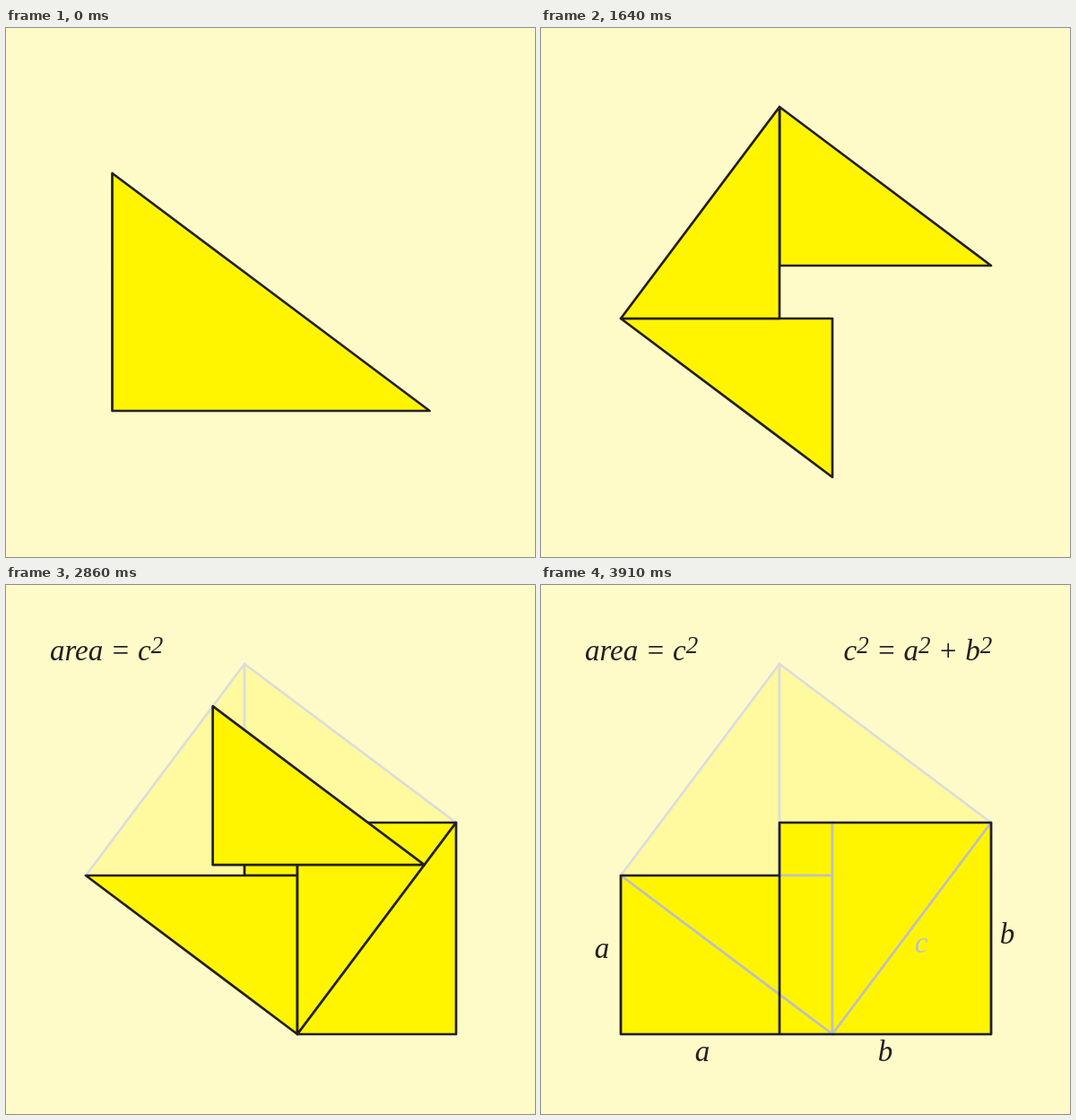
Animation of 590 by 590 pixels, one loop 5160 ms. Source, as an HTML page:

```html
<!DOCTYPE html>
<html lang="en">
<head>
<meta charset="utf-8">
<title>Pythagorean rearrangement</title>
<style>
  html, body { margin: 0; width: 100%; height: 100%; overflow: hidden; background: #fffbc8; }
  svg { display: block; width: 100%; height: 100%; --ink: #231f20; }
  .shape { fill: #fff500; stroke: var(--ink); }
  .ghost { fill: #fff99f; stroke: #dcdddd; }
  .shape, .ghost, .frame { stroke-width: 2.7; stroke-linejoin: round; }
  .frame { fill: none; stroke: #231f20; }
  text { font: italic 33px "Liberation Serif", "Times New Roman", serif; fill: #231f20; }
  .label text { text-anchor: middle; }
  .fading text { fill: var(--ink); }
  .small text { font-size: 25px; }
  .sup { font-size: 27px; }
</style>
</head>
<body>
<!-- data-on / data-off: visible time span in ms -->
<svg viewBox="0 0 590 590">
  <path class="ghost" data-on="2290" d="M266 88V324H89Z"/>
  <path class="ghost" data-on="2860" d="M266 88V265H502Z"/>

  <path class="shape" data-on="1960" d="M266 265H325V324H266Z"/>
  <path class="shape" data-on="1640" d="M89 324H325V501Z"/>
  <path class="shape" data-on="1800" d="M502 265H325V501Z"/>
  <g class="label small" data-on="1960" data-off="2610">
    <text x="385" y="164">c</text>
    <text x="430" y="396.5">c</text>
  </g>
  <g id="movers">
    <path id="first" class="shape"/>
    <path id="second" class="shape" data-on="1480" d="M266 88V324H89Z"/>
  </g>
  <path class="frame" data-on="1150" data-off="1480" d="M280 265.6h4"/>

  <g class="label" data-on="330" data-off="660">
    <text x="139.5" y="311">a</text>
    <text x="250" y="411">b</text>
    <text x="262" y="310">c</text>
  </g>
  <g class="label fading" data-on="3180">
    <text x="424" y="410">c</text>
    <g data-off="3910">
      <text x="68" y="416">a</text>
      <text x="520" y="400">b</text>
      <text x="180" y="531">b</text>
      <text x="404" y="531">a</text>
    </g>
  </g>
  <g class="label" data-on="3910">
    <path class="frame" d="M89 324H266V501H89ZM266 265H502V501H266Z"/>
    <text x="68" y="416">a</text>
    <text x="520" y="400">b</text>
    <text x="180" y="531">a</text>
    <text x="384" y="531">b</text>
  </g>

  <text data-on="1960" x="49" y="84">area = c<tspan class="sup" dy="-8">2</tspan></text>
  <text data-on="3910" x="337.5" y="84">c<tspan class="sup" dy="-8">2</tspan><tspan dy="8"> = a</tspan><tspan class="sup" dy="-8">2</tspan><tspan dy="8"> + b</tspan><tspan class="sup" dy="-8">2</tspan></text>
</svg>
<script>
  const LOOP = 5160;
  const svg = document.querySelector('svg');
  const movers = document.getElementById('movers');
  const first = document.getElementById('first');
  const second = document.getElementById('second');
  const timed = [...document.querySelectorAll('[data-on], [data-off]')];

  // [start time, value]
  const inks = [[0, '#231f20'], [3430, '#595757'], [3590, '#8c8b8b'], [3750, '#bfc0c0']];
  const outlines = [
    [0, 'M118.5 162V427H472.5Z'],
    [990, 'M192 125V346H487Z'],
    [1150, 'M266 88V265H502Z']
  ];

  const valueAt = (table, t) => table.filter(([start]) => start <= t).pop()[1];

  // Five equal hops, 80 ms apart
  const hops = (t, start) => Math.min(5, Math.max(0, Math.floor((t - start) / 80) + 1)) / 5;

  function slide(el, dx, dy, p) {
    el.setAttribute('transform', `translate(${dx * p} ${dy * p})`);
  }

  function render(t) {
    for (const el of timed) {
      const { on = 0, off = LOOP } = el.dataset;
      el.style.display = t >= on && t < off ? '' : 'none';
    }
    svg.style.setProperty('--ink', valueAt(inks, t));
    first.setAttribute('d', valueAt(outlines, t));
    slide(second, 236, 177, hops(t, 2290));
    slide(first, -177, 236, hops(t, 2860));

    // The moving triangle stays on top
    const top = t < 2860 ? second : first;
    if (movers.lastElementChild !== top) movers.append(top);
  }

  const begin = performance.now();
  function tick() {
    render((performance.now() - begin) % LOOP);
    requestAnimationFrame(tick);
  }
  tick();
</script>
</body>
</html>
```
